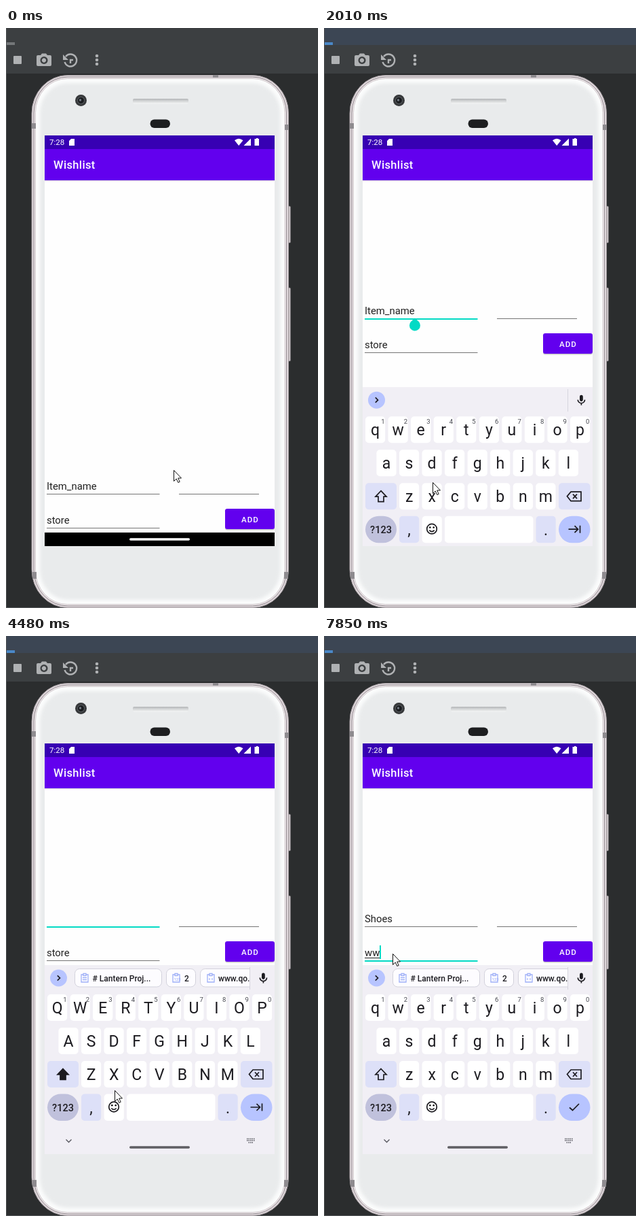
An HTML page that plays this animation: 460 by 853 pixels, repeating every 8 s.

```html
<!DOCTYPE html>
<html lang="en">
<head>
<meta charset="utf-8">
<title>Wishlist demo</title>
<style>
html, body { margin: 0; width: 100%; height: 100%; overflow: hidden; background: #2b2d2e; }
svg { display: block; width: 100vw; height: 100vh; font-family: Roboto, sans-serif; }
.field { font-size: 14.85px; fill: #212121; }
.key { font-size: 23px; fill: #1c1b20; text-anchor: middle; }
.hint { font-size: 9.5px; fill: #45464f; text-anchor: middle; }
.chip { font-size: 12px; font-weight: 500; fill: #1c1b20; }
.line { fill: none; stroke: #1c1b20; stroke-width: 1.7; }
.clip { fill: none; stroke: #9fb0f8; stroke-width: 1.3; }
</style>
</head>
<body>
<svg viewBox="0 0 460 853" preserveAspectRatio="none">
  <defs>
    <filter id="soft"><feGaussianBlur stdDeviation="2.5"/></filter>
    <linearGradient id="grill" x1="0" y1="0" x2="0" y2="1">
      <stop offset="0" stop-color="#b3b5b7"/><stop offset=".4" stop-color="#d0d2d3"/><stop offset="1" stop-color="#f5f6f6"/>
    </linearGradient>
    <clipPath id="screen"><rect x="57" y="158" width="339" height="604"/></clipPath>
    <clipPath id="strip"><rect x="57" y="484" width="302" height="40"/></clipPath>
  </defs>

  <!-- Emulator toolbar -->
  <rect width="460" height="853" fill="#2b2d2e"/>
  <rect width="460" height="67" fill="#3c3f41"/>
  <rect id="header" width="460" height="25" fill="#3c3f41"/>
  <rect id="tab" x="1" y="21" width="12" height="4" fill="#747779"/>
  <rect width="1" height="853" fill="#505355"/>
  <rect y="852" width="460" height="1" fill="#55585a"/>
  <g fill="#afb1b3">
    <rect x="11" y="41" width="12" height="12" rx="1"/>
    <path fill-rule="evenodd" d="M47 40h4l2-2.5h6l2 2.5h4q2 0 2 2v12q0 2-2 2H47q-2 0-2-2V42q0-2 2-2ZM56 42a5.500 5.500 0 1 0 .1 0ZM56 44.300a3.200 3.200 0 1 1-.1 0Z"/>
    <circle cx="134" cy="41" r="2.300"/><circle cx="134" cy="47" r="2.300"/><circle cx="134" cy="53" r="2.300"/>
    <path d="M84 39v8h8Z"/>
  </g>
  <path d="M88 42a9 9 0 1 1-1.500 8M95 52v-5h4" fill="none" stroke="#afb1b3" stroke-width="2.400"/>

  <!-- Phone body -->
  <g fill="#c9c2c5" stroke="#77747a" stroke-width=".6">
    <rect x="414" y="262" width="5.500" height="54" rx="1.500"/>
    <rect x="414" y="382" width="5.500" height="108" rx="1.500"/>
  </g>
  <rect x="38" y="69.500" width="378.500" height="783" rx="53" ry="56" fill="#e0d8dc" stroke="#a49da1"/>
  <rect x="41" y="72" width="372.500" height="778" rx="50" ry="53" fill="#e8e1e4" stroke="#938c91"/>
  <rect x="43.500" y="74.500" width="367.500" height="773" rx="47" ry="50" fill="#fbfcfc" stroke="#cfc8cb" stroke-width=".8"/>
  <rect x="50" y="81" width="354.500" height="760" rx="41" ry="44" fill="#e9ebec" filter="url(#soft)"/>
  <g fill="#8e8b8f">
    <rect x="38" y="140" width="6" height="8"/><rect x="411" y="142" width="5.500" height="8"/>
    <rect x="39" y="800" width="6" height="10"/><rect x="410" y="800" width="6" height="10"/>
    <rect x="305" y="69" width="8" height="4"/>
  </g>
  <circle cx="110.500" cy="106.500" r="8.500" fill="#37393b"/>
  <circle cx="110.500" cy="106.500" r="5" fill="#1b1d20" stroke="#606468"/>
  <circle cx="109.500" cy="106" r="1.700" fill="#747b84"/>
  <rect x="187" y="104" width="82" height="7.500" rx="2" fill="url(#grill)"/>
  <rect x="212.500" y="134.500" width="29.500" height="12.500" rx="6.200" fill="#1d1e20"/>

  <!-- App -->
  <g clip-path="url(#screen)">
    <rect x="57" y="158" width="339" height="604" fill="#fefefe"/>
    <rect x="57" y="224" width="339" height="1.200" fill="#dedede"/>
    <rect x="57" y="158" width="339" height="20" fill="#3700b3"/>
    <rect x="57" y="178" width="339" height="46" fill="#6200ee"/>
    <g fill="#fff">
      <text x="64" y="172.300" font-size="11.55">7:28</text>
      <path d="M96 163h5v10h-8v-7ZM337 165.300q6-5 12.500 0L343.200 173ZM361 162.500V173H350.500ZM368 163h1v-1h2.500v1h1.500v10h-6.500v-10Z"/>
      <text x="70" y="207" font-size="16.5" font-weight="500" letter-spacing=".35">Wishlist</text>
    </g>
    <g id="form">
      <text id="item" class="field" x="60" y="679"></text>
      <text id="store" class="field" x="60" y="729"></text>
      <rect id="itemLine" x="60" width="166.500"/>
      <rect id="storeLine" x="60" width="166.500"/>
      <rect x="255" y="685" width="118" height="1" fill="#757575"/>
      <rect id="compose" x="60" height="1" fill="#212121"/>
      <rect x="323" y="708" width="73" height="30.500" rx="3.300" fill="#000" opacity=".2"/>
      <rect x="323" y="707" width="73" height="30" rx="3.300" fill="#6200ee"/>
      <text x="347" y="726.800" font-size="11.55" font-weight="500" letter-spacing="1.03" fill="#fff">ADD</text>
      <rect id="caret" width="2" height="20" fill="#03dac5"/>
    </g>
    <g id="nav">
      <rect x="57" y="742" width="339" height="20"/>
      <rect x="182" y="750.300" width="89" height="3.400" rx="1.700" fill="#fff"/>
    </g>
    <g id="board"></g>
    <path id="handle" d="M0 0L5.700 5.300A8 8 0 1 1-5.700 5.300Z" fill="#03dac5"/>
  </g>
  <path id="mouse" d="M.5.5V16.500L4.200 13L6.800 18.500L9.200 17.400L6.700 12H11.500Z" fill="#fff" stroke="#111" stroke-width="1"/>
</svg>
<script>
const LOOP = 8000, LIFT = 258;
const $ = id => document.getElementById(id);
const set = (el, attrs) => { for (const k in attrs) el.setAttribute(k, attrs[k]); };
const show = (el, on) => set(el, { visibility: on ? 'visible' : 'hidden' });

// Keyboard markup
const box = (x, y, w, h, fill, r = 5) => `<rect x="${x}" y="${y}" width="${w}" height="${h}" rx="${r}" fill="${fill}"/>`;
const label = (cls, x, y, s) => `<text class="${cls}" x="${x}" y="${y}">${s}</text>`;
const path = (d, extra = '') => `<path class="line" d="${d}" ${extra}/>`;
const clipboard = (x, inner) => `<path class="clip" d="M${x + 4} 498H${x + 1}V509H${x + 11}V498H${x + 8}M${x + 4} 496.500h4v3h-4Z${inner}"/>`;
const chip = (x, w) => `<rect x="${x}" y="489.500" width="${w}" height="26.500" rx="7" fill="#fdfcff" stroke="#d3d2dc"/>`;
const tone = '#dde0f8', accent = '#b7c4ff', PITCH = 33.55;

function row(letters, x0, y, hints) {
  return [...letters].map((c, i) => {
    const x = x0 + i * PITCH;
    return box(x - 14.600, y, 29.200, 39, '#fff') + label('key letter', x, y + 27.500, c) +
      (hints ? label('hint', x + 11.200, y + 11, (i + 1) % 10) : '');
  }).join('');
}

$('board').innerHTML =
  box(57, 484, 339, 330, '#f1eff5', 0) +
  `<circle cx="77.500" cy="503" r="12.500" fill="${accent}"/>` + path('M75.800 499.300L79.500 503L75.800 506.700') +
  '<g id="chips" clip-path="url(#strip)">' +
    chip(101.500, 128) + clipboard(110, 'm-1 6h6m-6 3h6') + label('chip', 127.500, 507.500, '# Lantern Proj...') +
    chip(236.500, 43) + clipboard(245, '') +
    '<text x="247.500" y="506.800" font-size="6" fill="#8ea2f6">123</text>' + label('chip', 263, 507.500, '2') +
    chip(286.500, 110) + clipboard(296, 'm-1 8h2m2 0h2') + label('chip', 313, 507.500, 'www.qo.vexa') +
  '</g>' +
  box(359, 487, 1, 33, '#d6d5de', 0) +
  box(377, 495.500, 4.800, 9.500, '#1c1b20', 2.400) + path('M374.300 502.500a5 5 0 0 0 10.200 0M379.400 507.500v3', 'stroke-width="1.4"') +
  row('qwertyuiop', 75.600, 527, true) + row('asdfghjkl', 92, 576) + row('zxcvbnm', 125.600, 625) +
  box(61, 625, 46, 39, tone) + path('M84 636.500L92 645H88V652.500H80V645H76Z', 'id="shift"') +
  box(346, 625, 46.500, 39, tone) +
  path('M358.500 644.500L364 638H379V651.500H364ZM367 641.500L373 648M373 641.500L367 648') +
  box(61, 673.500, 46, 39.500, '#c0c1dc', 19.700) +
  '<text x="84" y="698.500" font-size="14.5" font-weight="500" text-anchor="middle" fill="#1c1b20">?123</text>' +
  box(111, 673.500, 29.200, 39.500, tone) + label('key', 125.600, 701.500, ',') +
  box(144.600, 673.500, 29.200, 39.500, '#fff') +
  '<circle class="line" cx="159" cy="692.500" r="7.300"/><circle cx="156.300" cy="690.300" r="1.300"/><circle cx="161.700" cy="690.300" r="1.300"/>' +
  path('M155.300 694.500q3.700 4 7.400 0') +
  box(178, 673.500, 130.500, 39.500, '#fff') +
  box(312.500, 673.500, 29.200, 39.500, tone) + label('key', 327, 701.500, '.') +
  box(346, 673.500, 46.500, 39.500, accent, 19.700) + path('', 'id="enter"') +
  '<path d="M88.500 740.500l4 4l4-4" fill="none" stroke="#55565d" stroke-width="1.300"/>' +
  '<path d="M355 739.500h12M355 742h12M357.500 745h7" fill="none" stroke="#55565d" stroke-width="1.300" stroke-dasharray="1.500 1"/>' +
  '<rect id="pill" x="182" y="750.300" width="89" height="3.400" rx="1.700"/>';

const letters = [...document.querySelectorAll('.letter')];
const lower = letters.map(el => el.textContent);

// Timelines: [start, value]
const itemText = [[0, 'Item_name'], [2390, 'Item_nam'], [2590, 'Item_na'], [2670, 'Item_n'], [2880, 'Item_'],
  [3030, 'Item'], [3110, 'Ite'], [3270, 'It'], [3470, 'I'], [3590, ''],
  [4600, 'S'], [4700, 'Sh'], [4790, 'Sho'], [4900, 'Shoe'], [4990, 'Shoes']];
const storeText = [[0, 'store'], [6740, 'stor'], [6980, 'sto'], [7160, 'st'], [7310, 's'], [7460, ''], [7670, 'w'], [7850, 'ww']];
const caretOn = [[0, 0], [1220, 1], [1640, 0], [2140, 1], [4080, 0], [4560, 1], [5780, 0], [6260, 1]];
const pillTone = [[0, '#c8c7cd'], [2880, '#68676c'], [3770, '#5f5e63']];
const mousePath = [[0, 247, 650], [570, 247, 650], [880, 160, 668], [5270, 160, 668], [5430, 93, 422],
  [5600, 170, 509], [5780, 170, 509], [6050, 101, 467], [LOOP, 101, 467]];
const slide = [[1930, 140], [1950, 110], [2010, 44.5], [2100, 14], [2200, 0], [LOOP, 0]];

const at = (list, t) => list.filter(e => e[0] <= t).pop()[1];
const clamp = v => Math.max(0, Math.min(1, v));

function along(points, t, k = 1) {
  const i = points.findIndex(p => p[0] > t);
  if (i < 1) return points[i ? points.length - 1 : 0][k];
  const a = points[i - 1], b = points[i];
  return a[k] + (b[k] - a[k]) * (t - a[0]) / (b[0] - a[0]);
}

const width = el => el.textContent ? el.getComputedTextLength() : 0;

function underline(el, y, active) {
  set(el, active ? { y, height: 2, fill: '#03dac5' } : { y, height: 1, fill: '#757575' });
}

function draw(t) {
  const focused = t >= 1060, open = t >= 1950, onStore = t >= 6260, upper = t >= 4480 && t < 4600;
  set($('header'), { fill: focused ? '#3c4654' : '#3c3f41' });
  set($('tab'), { fill: focused ? '#4a88c7' : '#747779' });

  $('item').textContent = at(itemText, t);
  $('store').textContent = at(storeText, t);
  underline($('itemLine'), 685, focused && !onStore);
  underline($('storeLine'), 735, onStore);
  set($('form'), { transform: `translate(0 ${open ? -LIFT : 0})` });

  const active = $(onStore ? 'store' : 'item'), drop = onStore ? 50 : 0;
  const end = 60 + width(active);
  set($('caret'), { x: Math.floor(end), y: 663 + drop });
  show($('caret'), at(caretOn, t));
  const composing = t >= 4600 && !onStore || t >= 7670;
  set($('compose'), { y: 681 + drop, width: composing ? end - 60 : 0 });

  const grow = t < 2390 ? clamp((t - 1340) / 90) : onStore && t < 6740 ? clamp((t - 6320) / 90) : 0;
  set($('handle'), {
    transform: `translate(${end + .3} ${684.5 + drop - (open ? LIFT : 0)})`,
    opacity: grow
  });

  show($('nav'), !open);
  $('board').style.display = open ? '' : 'none';
  set($('board'), { transform: `translate(0 ${along(slide, t)})` });
  $('chips').style.display = t >= 2250 ? '' : 'none';
  letters.forEach((el, i) => { el.textContent = upper ? lower[i].toUpperCase() : lower[i]; });
  $('shift').style.fill = upper ? '#1c1b20' : 'none';
  set($('enter'), { d: onStore ? 'M362 693.500L366.500 697.500L376 688' : 'M360.500 693H374M369.500 688L374.500 693L369.500 698M377.500 687.500V698.500' });
  set($('pill'), { fill: at(pillTone, t) });

  set($('mouse'), { transform: `translate(${along(mousePath, t)} ${along(mousePath, t, 2)})` });
}

const start = performance.now();
function tick() {
  draw((performance.now() - start) % LOOP);
  requestAnimationFrame(tick);
}
tick();
</script>
</body>
</html>
```
